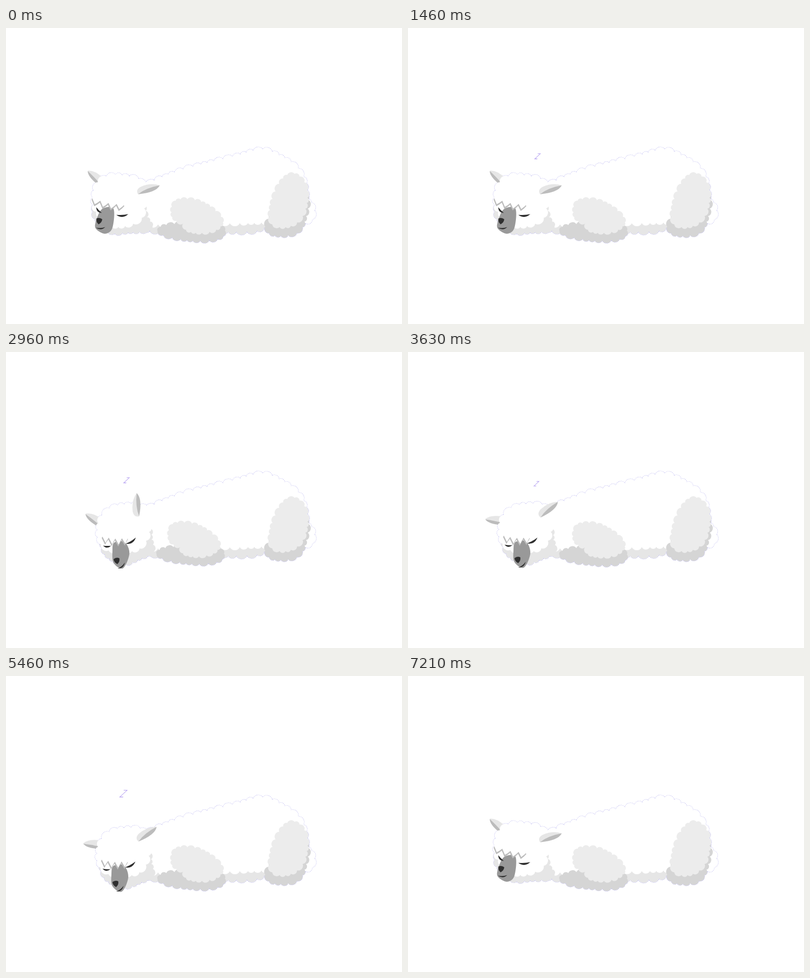
Recreate the animation shown at these times as an HTML page. Size 800 by 600 pixels, loop 7290 ms.

```html
<!DOCTYPE html>
<html lang="en">
<head>
<meta charset="utf-8">
<title>Sleeping alpaca</title>
<style>
  html, body { margin: 0; width: 100%; height: 100%; overflow: hidden; background: #fff; }
  svg { display: block; width: 800px; height: 600px; }
</style>
</head>
<body>
<svg id="stage" viewBox="0 0 800 600" xmlns="http://www.w3.org/2000/svg">
  <g id="outlines" fill="none" stroke="#b3afee" stroke-width="1.4" stroke-dasharray="1.6 1.4"></g>
  <g id="wool"></g>
  <g id="face"></g>
  <g id="snores" fill="none" stroke="#b09af0" stroke-width="1.1"></g>
</svg>
<script>
const LOOP = 7290;
const WHITE = '#fff', PALE = '#e6e6e6', LIGHT = '#ececec', SHADE = '#d5d5d5', FRINGE = '#bcbcbc', DARK = '#2f2f2f';
const SVG = 'http://www.w3.org/2000/svg';

const pts = text => text.split(' ').map(p => p.split(',').map(Number));
const mix = (a, b, k) => a + (b - a) * k;
const mixPt = (a, b, k) => [mix(a[0], b[0], k), mix(a[1], b[1], k)];
const poses = (rest, nod) => k => pts(rest).map((p, i) => mixPt(p, pts(nod)[i], k));

function add(parent, tag, attrs) {
  const node = document.createElementNS(SVG, tag);
  for (const name in attrs) node.setAttribute(name, attrs[name]);
  return document.getElementById(parent).appendChild(node);
}

// Smooth closed curve through a few key points.
function ring(list) {
  const n = list.length, p = i => list[(i + n) % n];
  const handle = (i, side) => [0, 1].map(c => p(i)[c] + side * (p(i + 1)[c] - p(i - 1)[c]) / 6);
  return list.reduce((d, _, i) => d + `C${handle(i, 1)} ${handle(i + 1, -1)} ${p(i + 1)}`, `M${list[0]}`) + 'Z';
}

// The same curve, edged with slightly uneven round tufts.
const ruler = document.createElementNS(SVG, 'path');
function fluff(list, tufts) {
  ruler.setAttribute('d', ring(list));
  const length = ruler.getTotalLength();
  const spot = i => ruler.getPointAtLength(length * ((i % tufts) + 0.5 + 0.2 * Math.sin((i % tufts) * 5)) / tufts);
  let from = spot(0), d = `M${from.x} ${from.y}`;
  for (let i = 1; i <= tufts; i++) {
    const to = spot(i), r = Math.hypot(to.x - from.x, to.y - from.y) * 0.56;
    d += `A${r} ${r} 0 0 1 ${to.x} ${to.y}`;
    from = to;
  }
  return d + 'Z';
}

// A wool shape plus its faint dotted outline underneath.
function wool(fill, tufts, keys) {
  const d = keys ? fluff(pts(keys), tufts) : '';
  const nodes = [add('outlines', 'path', { d }), add('wool', 'path', { d, fill })];
  return (name, value) => nodes.forEach(n => n.setAttribute(name, value));
}

const shape = (fill, d = '') => add('face', 'path', { fill, d });
const crescent = (width, sag, thick) =>
  shape(DARK, `M${-width / 2} 0Q0 ${2 * sag} ${width / 2} 0Q0 ${2 * (sag - thick)} ${-width / 2} 0Z`);

function ear(parent, light, dark) {
  const node = add(parent, 'g', {});
  node.innerHTML = `<path fill="${PALE}" d="${light}"/><path fill="${FRINGE}" d="${dark}"/>`;
  return node;
}

// Tail, belly, body
wool(WHITE, 8, '600,350 618,355 623,375 615,392 598,392');
wool(PALE, 32, '270,385 390,385 500,385 525,398 500,412 390,412 290,411 262,400');
wool(WHITE, 53, '250,340 290,314 343,292 400,275 455,262 515,246 553,259 590,285 608,330 590,385 520,394 430,396 320,398 255,393');

// Hind leg, front leg
wool(SHADE, 19, '585,330 610,345 605,385 590,414 550,421 527,412 526,395 550,365');
wool(LIGHT, 21, '576,295 598,306 609,335 602,375 585,396 558,404 534,394 534,365 541,340 556,310');
const legShade = wool(SHADE, 20, '306,407 335,398 400,398 438,402 441,416 430,427 385,431 345,426 315,418');
const legWool = wool(LIGHT, 22, '338,354 365,347 400,355 430,378 438,395 420,411 385,415 362,408 356,394 337,386');

// Head
const farEar = ear('wool', 'M-3 9Q19 11 30 1Q24 -7 -3 -8Z', 'M30 0Q13 -1 0 -3L-3 -8Q22 -9 30 0Z');
const headShade = wool(PALE), head = wool(WHITE);
const muzzle = shape('#999'), fringeShade = shape(FRINGE), fringe = shape(WHITE);
const nearEye = crescent(24, 5, 4), farEye = crescent(16, 4, 3.5), mouth = crescent(19, 4, 2.5);
const nose = shape(DARK, 'M-6 -4Q0 -8 6 -4Q6 3 0 7Q-6 3 -6 -4Z');
const nearEar = ear('face', 'M0 3Q-3 -7 9 -10Q32 -13 47 -2Q30 4 0 3Z', 'M0 3Q20 -5 47 -2Q36 10 0 3Z');

const headShadePose = poses(
  '182,355 230,345 278,358 283,380 296,402 285,411 245,414 212,415 185,392 176,378',
  '194,378 240,350 288,355 293,380 298,405 272,418 246,428 225,428 200,410 193,396');
const headPose = poses(
  '176,352 180,320 207,299 243,300 272,308 284,325 280,358 274,385 250,399 215,402 192,380 177,367',
  '184,368 189,337 212,314 245,308 274,310 289,325 289,356 284,380 262,402 222,402 204,400 189,385');
const muzzlePose = poses(
  '194,367 217,366 215,405 200,417 181,406 183,388',
  '217,385 238,384 247,408 234,437 215,426 213,402');
// Hairline left end, right end, and the sweep of each lock
const fringePose = poses('174,344 240,357 -3,10', '193,371 247,374 0,12');

// Pointed locks hanging from a hairline, shifted by dx, dy.
function locks([left, right, sweep], dx, dy) {
  const count = 4;
  const root = u => [mix(left[0], right[0], u) + dx, mix(left[1], right[1], u) + 4 * Math.sin(Math.PI * u) + dy];
  let d = `M${left[0] + 8 + dx} ${left[1] - 14 + dy}L${root(0)}`;
  for (let i = 0; i < count; i++) {
    const [x, y] = root((i + 0.5) / count), tip = [x + sweep[0], y + sweep[1]], next = root((i + 1) / count);
    d += `L${tip}Q${next[0] - 4} ${mix(tip[1], next[1], 0.5)} ${next}`;
  }
  return d + `L${right[0] - 8 + dx} ${right[1] - 14 + dy}Z`;
}

// Eased keyframe tracks: [time, value]
const nodTrack = [[1900, 0], [2960, 1.07], [3740, 1], [6130, 1], [7170, 0]];
const nearEarTrack = [[1700, -16], [2210, -33], [2960, -90], [3740, -33], [6040, -33], [6450, -46], [7170, -16]];
const farEarTrack = [[1900, 220], [2960, 212], [3740, 184], [6130, 184], [7170, 220]];
const legTrack = [[2210, 0], [2960, 1], [3740, 0]];

function at(track, t) {
  const i = track.findIndex(key => key[0] > t);
  if (i === 0) return track[0][1];
  if (i < 0) return track[track.length - 1][1];
  const [t0, a] = track[i - 1], [t1, b] = track[i];
  const u = (t - t0) / (t1 - t0);
  return mix(a, b, u * u * (3 - 2 * u));
}

const snores = Array.from({ length: 9 }, (_, i) => ({
  start: 365 + 750 * i,
  drift: -10 + 32 * Math.cos((i - 1) * Math.PI * 2 / 3 + 0.25),
  node: add('snores', 'path', {})
}));

function drawSnore({ start, drift, node }, t) {
  const u = (t - start) / 750;
  const visible = u >= 0 && u < 1.1;
  node.setAttribute('visibility', visible ? 'visible' : 'hidden');
  if (!visible) return;
  const h = 3 + 5 * u, w = h / 2;
  node.setAttribute('d', `M${-w} ${-h}H${w}L${-w} ${h}H${w}`);
  node.setAttribute('transform', `translate(${252 + drift * u} ${290 - 65 * u}) skewX(-30)`);
}

function draw(t) {
  const k = at(nodTrack, t), leg = at(legTrack, t);
  const place = (node, rest, nod, angle) =>
    node.setAttribute('transform', `translate(${mixPt(rest, nod, k)}) rotate(${angle})`);

  legShade('transform', `translate(${-2 * leg} ${-2 * leg})`);
  legWool('transform', `translate(${-6 * leg} ${-leg})`);

  headShade('d', fluff(headShadePose(k), 24));
  head('d', fluff(headPose(k), 20));
  muzzle.setAttribute('d', ring(muzzlePose(k)));
  fringe.setAttribute('d', locks(fringePose(k), 0, 0));
  fringeShade.setAttribute('d', locks(fringePose(k), -1, 4));

  place(nearEye, [235, 378], [251, 382], mix(-3, -30, k));
  place(farEye, [188, 369], [203, 391], mix(46, 4, k));
  place(mouth, [191, 404], [230, 431], mix(-3, -38, k));
  place(nose, [188, 391], [221.5, 421], mix(8, -8, k));
  place(nearEar, [266, 334], [266, 333], at(nearEarTrack, t));
  place(farEar, [188, 309], [186, 342], at(farEarTrack, t));

  snores.forEach(s => drawSnore(s, t));
}

let begin;
function tick(now) {
  begin ??= now;
  draw((now - begin) % LOOP);
  requestAnimationFrame(tick);
}
draw(0);
requestAnimationFrame(tick);
</script>
</body>
</html>
```
